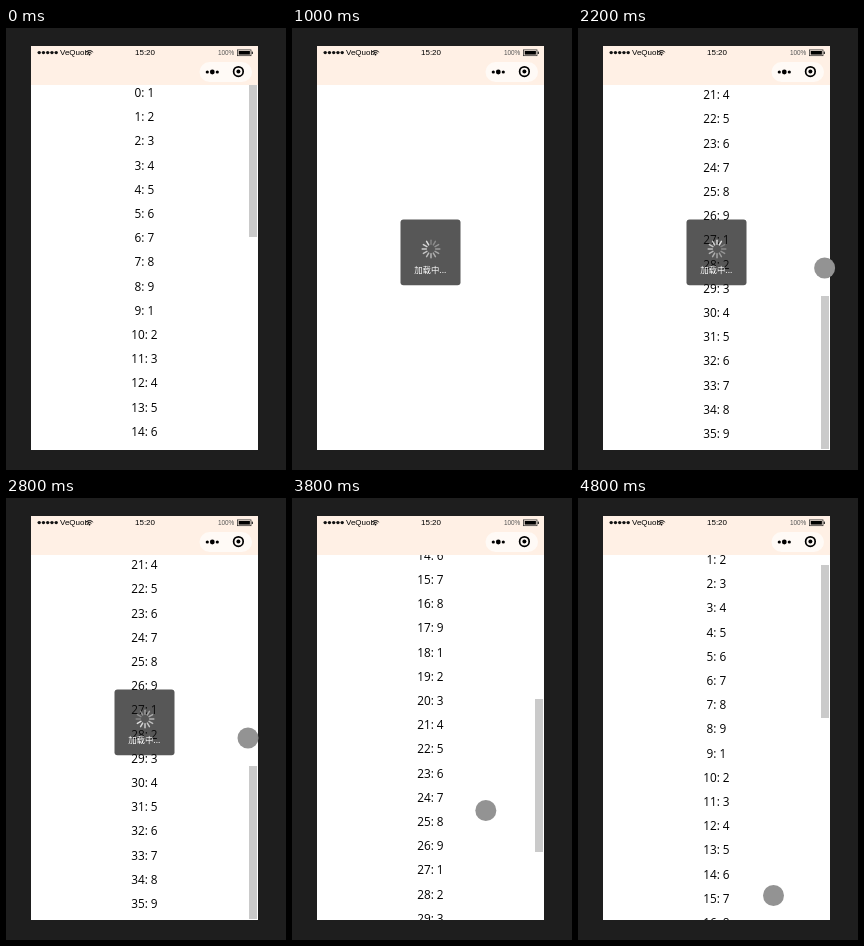
Recreate the animation shown at these times as an HTML page with a canvas. Size 280 by 442 pixels, loop 5000 ms.

```html
<!DOCTYPE html>
<html lang="zh">
<head>
<meta charset="utf-8">
<title>List loading</title>
<style>
html, body { margin: 0; width: 100%; height: 100%; overflow: hidden; background: #1e1e1e; }
canvas { display: block; width: 280px; height: 442px; }
</style>
</head>
<body>
<canvas id="stage"></canvas>
<script>
const W = 280, H = 442, LOOP = 5000, STEP = 200;
const PAGE = { x: 25, y: 57, w: 227, h: 365 };
const ROWS = 36, ROW_H = 24.2, MAX_SCROLL = 506, THUMB = 153;
const SANS = '"Liberation Sans", Arial, sans-serif';

const linear = p => p;
const easeIn = p => p * p;
const easeOut = p => 1 - (1 - p) ** 3;

// The pointer glides in, drags the list down, returns and drags again.
const PATH = [
  { t: 1800, x: 272, y: 226, scroll: MAX_SCROLL, ease: linear },
  { t: 2000, x: 253, y: 240, scroll: MAX_SCROLL, ease: easeOut },
  { t: 2800, x: 242, y: 240, scroll: MAX_SCROLL, ease: easeIn },
  { t: 3400, x: 209.5, y: 153.5, scroll: MAX_SCROLL, ease: linear },
  { t: 4000, x: 186, y: 392, scroll: 266, ease: linear },
  { t: 4200, x: 178.5, y: 181.5, scroll: 246.5, ease: linear },
  { t: 4800, x: 195.5, y: 397.5, scroll: 27.2, ease: linear }
];

function pointerAt(t) {
  const next = PATH.findIndex(k => k.t > t);
  if (next === 0) return null;
  if (next < 0) return PATH[PATH.length - 1];
  const a = PATH[next - 1], b = PATH[next];
  const p = a.ease((t - a.t) / (b.t - a.t));
  const mix = key => a[key] + (b[key] - a[key]) * p;
  return { x: mix('x'), y: mix('y'), scroll: mix('scroll') };
}

const canvas = document.getElementById('stage');
const ctx = canvas.getContext('2d');
const dpr = window.devicePixelRatio || 1;
canvas.width = W * dpr;
canvas.height = H * dpr;

function rect(x, y, w, h, color) {
  ctx.fillStyle = color;
  ctx.fillRect(x, y, w, h);
}

function pill(x, y, w, h, r, color) {
  ctx.fillStyle = color;
  ctx.beginPath();
  ctx.roundRect(x, y, w, h, r);
  ctx.fill();
}

function dot(x, y, r, color) {
  ctx.fillStyle = color;
  ctx.beginPath();
  ctx.arc(x, y, r, 0, Math.PI * 2);
  ctx.fill();
}

function text(str, x, y, font, color, align = 'center') {
  ctx.font = font;
  ctx.fillStyle = color;
  ctx.textAlign = align;
  ctx.fillText(str, x, y);
}

function arc(x, y, r, from, to, width) {
  ctx.strokeStyle = '#000';
  ctx.lineWidth = width;
  ctx.beginPath();
  ctx.arc(x, y, r, from, to);
  ctx.stroke();
}

function drawHeader() {
  rect(PAGE.x, 18, PAGE.w, 39, '#fff0e5');
  for (let i = 0; i < 5; i++) dot(33.2 + i * 4.25, 24.6, 1.7, '#111');
  text('VeQuob', 54, 27, '8px ' + SANS, '#000', 'left');
  for (const r of [4.6, 2.7]) arc(83.5, 27.2, r, -Math.PI * 0.77, -Math.PI * 0.23, 1);
  dot(83.5, 26.6, 0.9, '#000');
  text('15:20', 139, 27, '8px ' + SANS, '#000');
  text('100%', 228.3, 27, '6.4px ' + SANS, '#555', 'right');

  ctx.strokeStyle = '#222';
  ctx.lineWidth = 0.7;
  ctx.strokeRect(231.6, 21.9, 13.4, 5.8);
  rect(232.7, 23, 11.2, 3.6, '#000');
  rect(245.7, 23.6, 1.2, 2.4, '#222');

  pill(193.5, 34, 52.5, 20, 10, '#fffaf6');
  for (const i of [-1, 0, 1]) dot(206.3 + i * 5, 44, i ? 1.6 : 2.4, '#000');
  arc(232.4, 43.6, 4.8, 0, Math.PI * 2, 1.7);
  dot(232.4, 43.6, 2, '#000');
}

function drawList(scroll, showBar) {
  ctx.save();
  ctx.beginPath();
  ctx.rect(PAGE.x, PAGE.y, PAGE.w, PAGE.h);
  ctx.clip();
  for (let i = 0; i < ROWS; i++) {
    text(`${i}: ${i % 9 + 1}`, 138.4, Math.round(69 + i * ROW_H - scroll),
      '11.8px "Open Sans", "Noto Sans", sans-serif', '#000');
  }
  if (showBar) {
    const top = PAGE.y + scroll / MAX_SCROLL * (PAGE.h - THUMB);
    rect(243, Math.floor(top - 0.5), 8, THUMB, '#cacaca');
  }
  ctx.restore();
}

function drawToast(t) {
  pill(108.5, 191.5, 60, 65.7, 3, 'rgba(17,17,17,.7)');
  const turn = Math.floor(t * 12 / 1000);
  ctx.save();
  ctx.translate(139, 221);
  ctx.lineCap = 'round';
  ctx.lineWidth = 1.5;
  for (let i = 0; i < 12; i++) {
    const a = (i + turn) * Math.PI / 6;
    ctx.strokeStyle = `rgba(235,235,235,${0.3 + i * 0.055})`;
    ctx.beginPath();
    ctx.moveTo(Math.sin(a) * 4.7, -Math.cos(a) * 4.7);
    ctx.lineTo(Math.sin(a) * 8.8, -Math.cos(a) * 8.8);
    ctx.stroke();
  }
  ctx.restore();
  text('加载中...', 138.3, 245, '8.4px "Noto Sans CJK SC", "Noto Sans CJK", sans-serif', '#fff');
}

function draw(t) {
  const pointer = pointerAt(t);
  const reset = t >= 400 && t < 600;
  const empty = t >= 400 && t < 1200;
  const scroll = pointer ? pointer.scroll : t >= 1400 ? MAX_SCROLL : 0;

  ctx.setTransform(dpr, 0, 0, dpr, 0, 0);
  rect(0, 0, W, H, '#1e1e1e');
  rect(PAGE.x, PAGE.y, PAGE.w, PAGE.h, reset ? '#f8f8f8' : '#fff');
  drawHeader();
  if (!empty) drawList(scroll, t < 400 || t >= 1400);
  if (t >= 1000 && t < 3000) drawToast(t);
  if (pointer) dot(pointer.x, pointer.y, 10.5, '#939393');
}

const start = performance.now();
function tick() {
  const t = (performance.now() - start) % LOOP;
  draw(Math.floor(t / STEP) * STEP);
  requestAnimationFrame(tick);
}
tick();
</script>
</body>
</html>
```
